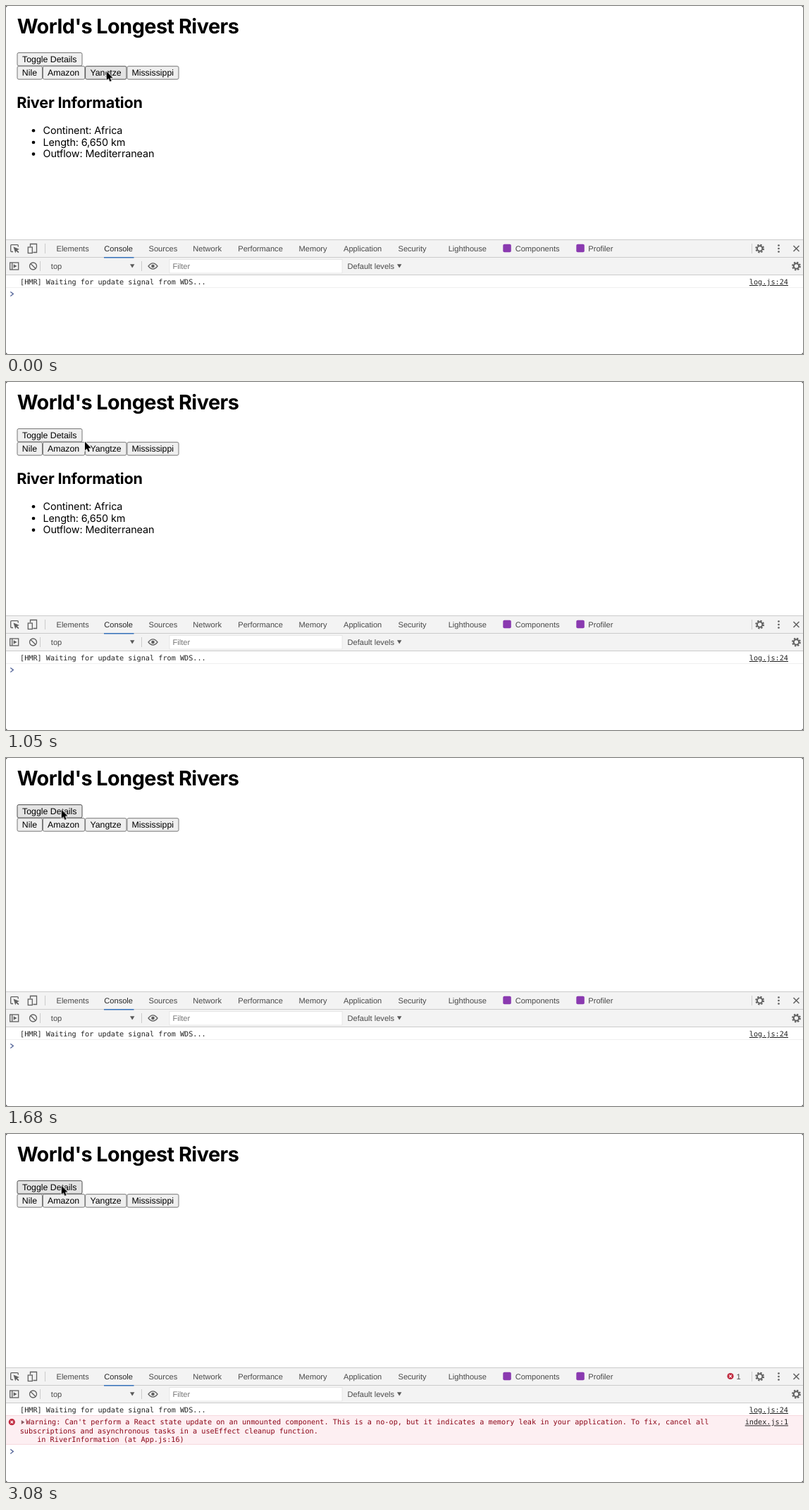
An HTML page that plays this animation: 1131 by 495 pixels, repeating every 3150 ms.

```html
<!DOCTYPE html>
<html lang="en">
<head>
<meta charset="utf-8">
<title>World's Longest Rivers</title>
<style>
  html, body { margin: 0; width: 100%; height: 100%; overflow: hidden; background: #fff; }
  svg { display: block; }
  text { white-space: pre; text-rendering: geometricPrecision; }

  .page { font-family: Inter, "Open Sans", sans-serif; font-optical-sizing: none; }
  .title { font-size: 28.8px; font-weight: 700; letter-spacing: -.51px; }
  .subtitle { font-size: 21.6px; font-weight: 700; letter-spacing: -.19px; }
  .facts { font-size: 14.4px; letter-spacing: -.12px; }

  .buttons { font: 12.33px "Liberation Sans", Arial, sans-serif; }
  .buttons rect { fill: #efefef; stroke: #767676; }
  .tools { font: 11.1px "Liberation Sans", Arial, sans-serif; fill: #484848; }
  .tools .on { fill: #262626; }
  .console { font: 10.2px "DejaVu Sans Mono", "Liberation Mono", monospace; fill: #222; }
  .console .link { text-decoration: underline; }
  .console .bad { fill: #8c0618; }
  .icon { fill: none; stroke: #606060; stroke-width: 1.3; }
  .solid { fill: #606060; stroke: none; }

  /* The loop is 45 ticks of 70 ms; one tick is 2.222 %. */
  .info, .error, .prompt, .ring, .cursor, .buttons .yangtze, .buttons .toggle {
    animation: 3150ms step-end infinite;
  }
  .info { animation-name: info; }
  .error { animation-name: error; }
  .prompt { animation-name: prompt; }
  .ring { animation-name: ring; }
  .cursor { animation-name: cursor; }
  .buttons .yangtze { animation-name: yangtze; }
  .buttons .toggle { animation-name: toggle; }

  @keyframes info {
    0% { visibility: visible; }
    53.33%, 100% { visibility: hidden; }
  }
  @keyframes error {
    0% { visibility: hidden; }
    71.11%, 100% { visibility: visible; }
  }
  @keyframes prompt {
    0% { transform: none; }
    71.11%, 100% { transform: translateY(42px); }
  }
  @keyframes ring {
    0%, 17.77%, 53.33%, 100% { visibility: hidden; transform: translate(142px, 93px); }
    15.55% { visibility: visible; transform: translate(142px, 93px); }
    51.11% { visibility: visible; transform: translate(78.5px, 74px); }
  }
  @keyframes cursor {
    0% { transform: translate(142.7px, 93px); }
    26.66% { transform: translate(139.3px, 92.7px); }
    28.88% { transform: translate(134px, 91px); }
    31.11% { transform: translate(124px, 88.5px); }
    33.33% { transform: translate(112px, 84.8px); }
    35.55% { transform: translate(100px, 80.5px); }
    37.77% { transform: translate(89px, 77px); }
    39.99% { transform: translate(82px, 74.5px); }
    42.22%, 100% { transform: translate(78.7px, 73.4px); }
  }
  @keyframes yangtze {
    0%, 17.77% { fill: #e3e3e3; stroke: #4f4f4f; }
    15.55% { fill: #f6f6f6; stroke: #bdbdbd; }
    33.33%, 100% { fill: #efefef; stroke: #767676; }
  }
  @keyframes toggle {
    0% { fill: #efefef; stroke: #767676; }
    35.55%, 53.33%, 100% { fill: #e3e3e3; stroke: #4f4f4f; }
    51.11% { fill: #f6f6f6; stroke: #bdbdbd; }
  }
</style>
</head>
<body>
<svg width="1131" height="495" viewBox="0 0 1131 495">
  <defs>
    <g id="gear" class="icon">
      <circle r="3.7" stroke-width="2"/>
      <circle r="5.4" stroke-width="2" stroke-dasharray="2.3 1.94"/>
    </g>
    <g id="fault">
      <circle r="4.6" fill="#c02a3f"/>
      <path d="M-1.8 -1.8L1.8 1.8M1.8 -1.8L-1.8 1.8" stroke="#fff" stroke-width="1.2"/>
    </g>
    <path id="down" d="M-3.2 -2.6H3.2L0 2.8Z" fill="#5a5a5a"/>
  </defs>

  <g class="page">
    <text class="title" x="15.7" y="39">World's Longest Rivers</text>
    <g class="info">
      <text class="subtitle" x="15.2" y="144.7">River Information</text>
      <g class="facts">
        <circle cx="39" cy="177.3" r="2.3"/><text x="52.5" y="181.8">Continent: Africa</text>
        <circle cx="39" cy="194" r="2.3"/><text x="52.5" y="198.5">Length: 6,650 km</text>
        <circle cx="39" cy="210.6" r="2.3"/><text x="52.5" y="215.2">Outflow: Mediterranean</text>
      </g>
    </g>
  </g>

  <g class="buttons">
    <rect class="toggle" x="16" y="66.5" width="92" height="18.5" rx="2"/>
    <rect x="16" y="85.7" width="35.5" height="18.5" rx="2"/>
    <rect x="52.4" y="85.7" width="59.5" height="18.5" rx="2"/>
    <rect class="yangtze" x="112.6" y="85.7" width="58.4" height="18.5" rx="2"/>
    <rect x="171.9" y="85.7" width="73.1" height="18.5" rx="2"/>
    <text x="23" y="80">Toggle Details</text>
    <text x="22.8" y="99.4">Nile</text>
    <text x="59" y="99.4">Amazon</text>
    <text x="119.4" y="99.4">Yangtze</text>
    <text x="178.4" y="99.4">Mississippi</text>
  </g>

  <!-- tab strip and console toolbar -->
  <path d="M0 332H1131V382.5H0Z" fill="#f3f3f3"/>
  <path d="M0 332.5H1131M0 357.5H1131M0 382.5H1131M55.5 338V352M1058.5 338V352M48.5 363V377M192.5 363V377" stroke="#cbcbcb"/>
  <path d="M139 357.7H181.5" stroke="#3470b8" stroke-width="1.5"/>
  <rect x="232" y="360.5" width="245" height="19.5" fill="#fff" stroke="#e0e0e0" stroke-width=".7"/>

  <g class="tools">
    <text x="71.5" y="348.8">Elements</text>
    <text class="on" x="139.3" y="348.8">Console</text>
    <text x="202.5" y="348.8">Sources</text>
    <text x="265.3" y="348.8">Network</text>
    <text x="329.3" y="348.8">Performance</text>
    <text x="415.5" y="348.8">Memory</text>
    <text x="479" y="348.8">Application</text>
    <text x="556.5" y="348.8">Security</text>
    <text x="627.7" y="348.8">Lighthouse</text>
    <text x="722.7" y="348.8">Components</text>
    <text x="826.3" y="348.8">Profiler</text>
    <text x="63.8" y="373.6">top</text>
    <text x="236.5" y="374.3" fill="#757575">Filter</text>
    <text x="484.5" y="373.6">Default levels</text>
  </g>
  <rect x="705.3" y="338.8" width="11.5" height="11.5" rx="2" fill="#8a3ab0"/>
  <rect x="809.3" y="338.8" width="11.5" height="11.5" rx="2" fill="#8a3ab0"/>

  <g class="icon">
    <path d="M10 349.5H8Q6.7 349.5 6.7 348.2V341Q6.7 339.7 8 339.7H16Q17.3 339.7 17.3 341V342.5"/>
    <path class="solid" d="M10.5 342.5L19 346L15.8 347.2L18.5 350L17.3 351.2L14.5 348.4L13.3 351.5Z"/>
    <path d="M34.5 342V338.5H43.5V350.5H38.5"/>
    <rect x="31.3" y="343" width="6" height="8.5"/>
    <rect x="5.7" y="365" width="12" height="10"/>
    <path d="M8.7 365V375"/>
    <path class="solid" d="M10.7 367.2L15.5 370L10.7 372.8Z"/>
    <circle cx="38.5" cy="370" r="5"/>
    <path d="M35 366.5L42 373.5"/>
    <path d="M202 370Q208.5 361.8 215 370Q208.5 378.2 202 370Z"/>
    <circle cx="208.5" cy="370" r="2.3" class="solid"/>
    <path d="M1117.5 341L1125.5 349M1125.5 341L1117.5 349" stroke-width="1.5"/>
    <g class="solid">
      <circle cx="1096.5" cy="340.5" r="1.35"/>
      <circle cx="1096.5" cy="345" r="1.35"/>
      <circle cx="1096.5" cy="349.5" r="1.35"/>
    </g>
  </g>
  <use href="#gear" x="1069.7" y="345"/>
  <use href="#gear" x="1121.5" y="370"/>
  <use href="#down" x="179.2" y="369.8"/>
  <use href="#down" x="558.2" y="369.8"/>

  <g class="console">
    <path d="M0 400.5H1131" stroke="#efefef"/>
    <text x="20" y="396">[HMR] Waiting for update signal from WDS...</text>
    <text class="link" x="1054.8" y="396">log.js:24</text>
    <path class="prompt" d="M6.3 406.5L10.3 409.6L6.3 412.7" fill="none" stroke="#5b6b9d" stroke-width="1.4"/>
    <g class="error">
      <path d="M0 401H1131V442H0Z" fill="#fdeff2"/>
      <path d="M0 400.5H1131M0 441.5H1131" stroke="#f6d9de"/>
      <use href="#fault" x="8.3" y="409.7"/>
      <path d="M21.8 407L26.3 410L21.8 413Z" fill="#8a5a62"/>
      <g class="bad">
        <text x="28.3" y="413.4">Warning: Can't perform a React state update on an unmounted component. This is a no-op, but it indicates a memory leak in your application. To fix, cancel all</text>
        <text x="19.7" y="425.5">subscriptions and asynchronous tasks in a useEffect cleanup function.</text>
        <text x="19.7" y="437.5">    in RiverInformation (at App.js:16)</text>
      </g>
      <text class="link" x="1048.7" y="413.4">index.js:1</text>
    </g>
  </g>
  <g class="tools error">
    <use href="#fault" x="1028" y="344.5"/>
    <text x="1036.5" y="348.8">1</text>
  </g>

  <!-- window corners -->
  <path d="M0 0H2L0 2ZM1131 0H1129L1131 2ZM0 495H2L0 493ZM1131 495H1129L1131 493Z" fill="#555"/>

  <circle class="ring" r="19.7" fill="none" stroke="#111" stroke-width="1.5"/>
  <path class="cursor" d="M0 0V12.6L2.8 10L4.7 14.4L6.9 13.4L5 9.2H8.9Z" stroke="#fff" stroke-width="1.6" paint-order="stroke"/>
</svg>
</body>
</html>
```
